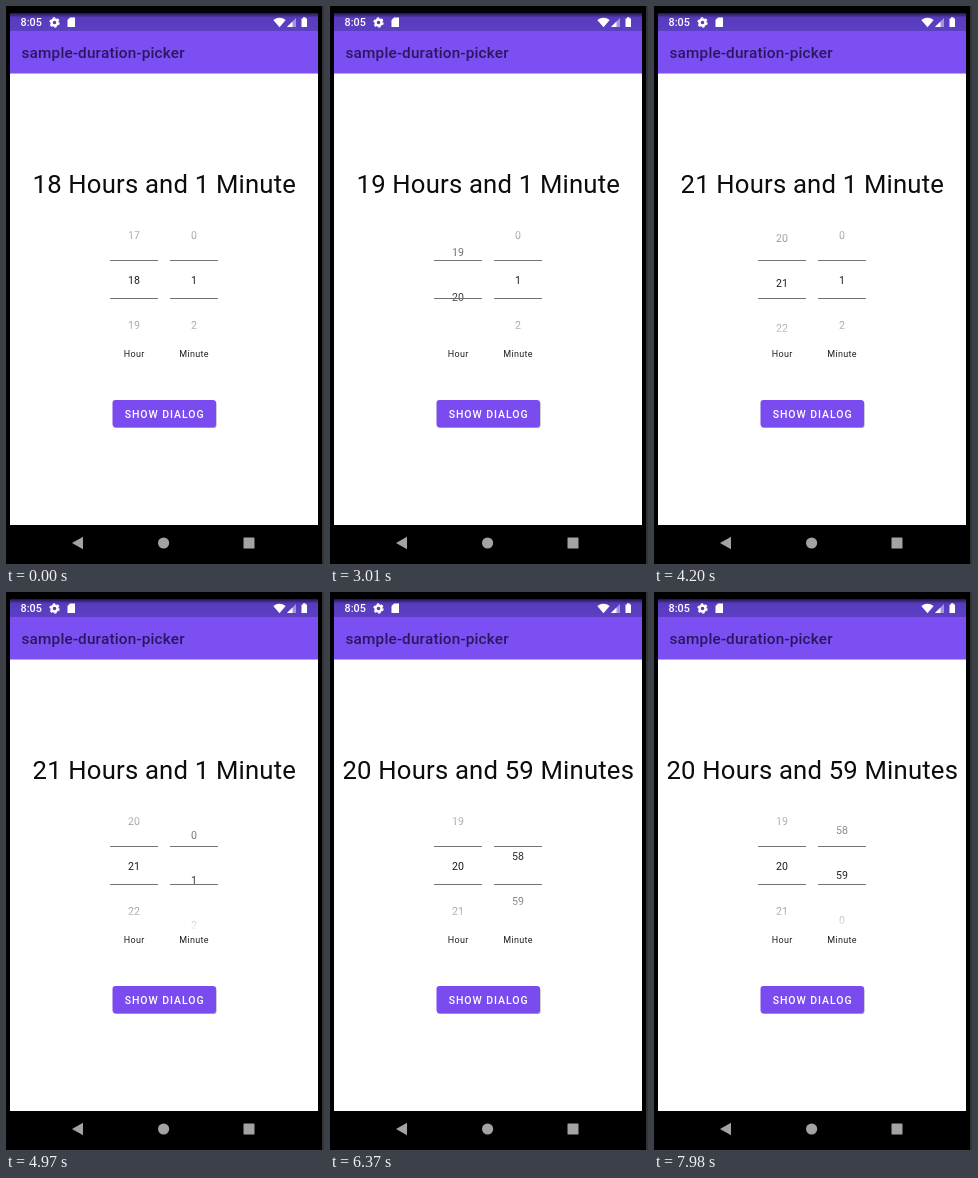
Write an HTML page that moves like this. It is 318 by 558 pixels and loops after 8000 ms.

```html
<!DOCTYPE html>
<html lang="en">
<head>
<meta charset="utf-8">
<title>Duration picker</title>
<style>
  html, body { margin: 0; width: 100%; height: 100%; overflow: hidden; background: #000; }
  svg { display: block; width: 318px; height: 558px; font-family: Roboto, sans-serif; }
  .mid { text-anchor: middle; }
  .medium { font-weight: 500; }
  .wheel text { font-size: 10.6px; fill: #1c1c1c; text-anchor: middle; }
  .wheel rect { fill: #4c4c4c; }
  .label { font-size: 9px; letter-spacing: .3px; fill: #222; }
  #title { font-size: 25.7px; letter-spacing: .19px; fill: #0c0c0c; }
</style>
</head>
<body>
<svg viewBox="0 0 318 558">
  <defs>
    <linearGradient id="fade" gradientUnits="userSpaceOnUse" x1="0" y1="207" x2="0" y2="341">
      <stop offset="0" stop-color="#fff" stop-opacity="0"/>
      <stop offset=".455" stop-color="#fff"/>
      <stop offset=".545" stop-color="#fff"/>
      <stop offset="1" stop-color="#fff" stop-opacity="0"/>
    </linearGradient>
    <mask id="edges" maskUnits="userSpaceOnUse" x="100" y="207" width="116" height="134">
      <rect x="100" y="207" width="116" height="134" fill="url(#fade)"/>
    </mask>
    <linearGradient id="status" x1="0" y1="0" x2="0" y2="1">
      <stop offset="0" stop-color="#21164a"/>
      <stop offset=".25" stop-color="#583bbd"/>
      <stop offset="1" stop-color="#5d3fc4"/>
    </linearGradient>
    <filter id="soft"><feGaussianBlur stdDeviation=".6"/></filter>
  </defs>

  <rect width="318" height="558"/>
  <rect x="316" width="2" height="558" fill="#333"/>
  <rect x="4" y="67" width="308" height="452" fill="#fff"/>
  <rect x="4" y="7" width="308" height="18" fill="url(#status)"/>
  <rect x="4" y="25" width="308" height="42" fill="#7c4ff2"/>
  <rect x="4" y="67" width="308" height="1" fill="#b9a6e6"/>

  <!-- status bar -->
  <g fill="#fff">
    <text class="medium" x="14.5" y="20.3" font-size="10.8">8:05</text>
    <circle cx="48.5" cy="16.5" r="3" fill="none" stroke="#fff" stroke-width="2.4"/>
    <circle cx="48.5" cy="16.5" r="4.5" fill="none" stroke="#fff" stroke-width="1.4" stroke-dasharray="2.4 2.312"/>
    <path d="M64 11.5h5v9.5h-7.5v-7z"/>
    <path d="M267.3 14q6.2-4.6 12.4 0l-6.2 7.2z"/>
    <path d="M281 21l9-9v9z" opacity=".45"/>
    <path d="M281 21l5.5-5.5v5.5z"/>
    <path d="M295.5 12.5h1.5v-1.2h2.6v1.2h1.4v8.6h-5.5z"/>
  </g>
  <text class="medium" x="15.5" y="51.8" font-size="15.3" letter-spacing=".19" fill="#2a1760" filter="url(#soft)">sample-duration-picker</text>

  <text id="title" class="mid" x="158.3" y="187"></text>
  <g mask="url(#edges)">
    <g class="wheel" id="hours"></g>
    <g class="wheel" id="minutes"></g>
  </g>
  <text class="label mid" x="128.2" y="351">Hour</text>
  <text class="label mid" x="188" y="351">Minute</text>

  <rect x="107" y="395" width="103.5" height="27" rx="3" fill="#999" filter="url(#soft)"/>
  <rect x="106.5" y="394" width="103.5" height="27" rx="3" fill="#7a4bef"/>
  <text class="mid medium" x="158.6" y="411.6" font-size="10.5" letter-spacing=".94" fill="#fff">SHOW DIALOG</text>

  <!-- navigation bar -->
  <g fill="#a3a3a3">
    <path d="M66 537l11-6.3v12.6z"/>
    <circle cx="157.6" cy="537" r="5.6"/>
    <rect x="237.5" y="531.5" width="11" height="11" rx=".6"/>
  </g>
</svg>
<script>
const LOOP = 8000, STEP = 70, ROW = 45, CENTER = 274, SNAP = .78;

// [time, wheel position]; minutes run below zero when they wrap to the previous hour
const hourKeys = [[0, 18], [1610, 18], [2310, 19], [2450, 19], [3010, 19.62],
  [3710, 20.29], [4130, 20.9], [4340, 21]];
const minuteKeys = [[0, 1], [4340, 1], [4970, .69], [5670, -.55], [5740, -.55], [6370, -1.777],
  [6580, -2], [7140, -2], [7490, -1.74], [7560, -1.74], [7980, -1.21]];

const byId = id => document.getElementById(id);
const mod = (n, m) => ((n % m) + m) % m;
const count = (n, unit) => `${n} ${unit}${n === 1 ? '' : 's'}`;

function add(parent, tag, attrs) {
  const el = document.createElementNS('http://www.w3.org/2000/svg', tag);
  for (const key in attrs) el.setAttribute(key, attrs[key]);
  return parent.appendChild(el);
}

function makeWheel(id, x, size) {
  const group = byId(id);
  const rows = [-1, 0, 1].map(() => add(group, 'text', { x }));
  for (const y of [254, 292]) add(group, 'rect', { x: x - 24, y, width: 48, height: 1 });
  return (pos, value) => rows.forEach((row, i) => {
    const n = value + i - 1;
    row.textContent = mod(n, size);
    row.setAttribute('y', CENTER + (n - pos) * ROW + 3.8);
  });
}

// The selected value only changes once the wheel has moved SNAP rows away from it.
function wheelAt(keys, t) {
  let value = keys[0][1], pos = value;
  const follow = () => {
    while (pos - value > SNAP) value++;
    while (value - pos > SNAP) value--;
  };
  for (let i = 1; i < keys.length && keys[i - 1][0] < t; i++) {
    const [t0, a] = keys[i - 1], [t1, b] = keys[i];
    pos = a + (b - a) * Math.min(1, (t - t0) / (t1 - t0));
    follow();
  }
  return { pos, value };
}

const drawHours = makeWheel('hours', 128, 24);
const drawMinutes = makeWheel('minutes', 188, 60);

function draw(now) {
  const t = Math.floor(now % LOOP / STEP) * STEP;
  const hour = wheelAt(hourKeys, t), minute = wheelAt(minuteKeys, t);
  const carry = Math.floor(minute.value / 60);
  drawHours(hour.pos + carry, hour.value + carry);
  drawMinutes(minute.pos, minute.value);
  byId('title').textContent =
    `${count(hour.value + carry, 'Hour')} and ${count(mod(minute.value, 60), 'Minute')}`;
}

const start = performance.now();
function tick() {
  draw(performance.now() - start);
  requestAnimationFrame(tick);
}
tick();
</script>
</body>
</html>
```
